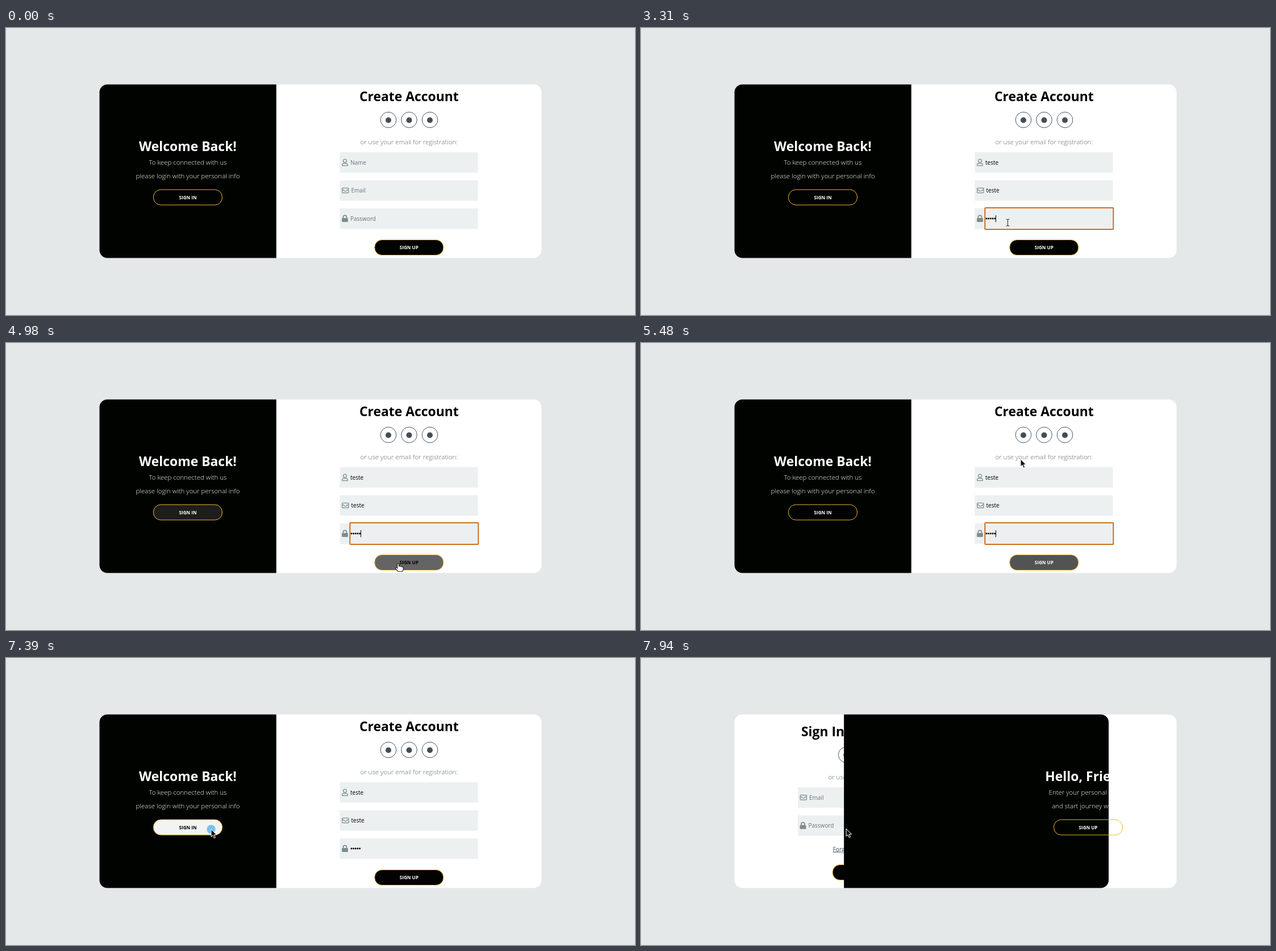
Recreate the animation shown at these times as an HTML page. Size 1107 by 506 pixels, loop 7990 ms.

```html
<!DOCTYPE html>
<html lang="en">
<head>
<meta charset="utf-8">
<title>Sign in / sign up</title>
<style>
  html, body { margin: 0; width: 100%; height: 100%; overflow: hidden; background: #e4e8e8; }
  svg { display: block; width: 1107px; height: 506px; font-family: "Open Sans", "Noto Sans", sans-serif; }
  text { white-space: pre; }
  .title { font-size: 22.9px; font-weight: 700; }
  .copy { font-size: 11.5px; font-weight: 300; }
  .label { font-size: 8.1px; font-weight: 700; }
  .input { font-size: 10px; }
  .mid { text-anchor: middle; }
</style>
</head>
<body>
<svg id="stage" viewBox="0 0 1107 506" xmlns="http://www.w3.org/2000/svg"></svg>
<script>
const LOOP = 7990, SWAP = 7430, SLIDE = 1100, CLICK = 7340;
const INK = '#000300', GOLD = '#ecb731', GREY = '#7f8c8d', FIELD = '#ecf0f1';
const BOX = { x: 164.5, y: 99.5, w: 778, h: 306, r: 14 };

// ---------- markup helpers ----------
const text = (cls, x, y, str, fill, id = '') =>
  `<text class="${cls}" x="${x}" y="${y}" fill="${fill}" ${id && `id="${id}"`}>${str}</text>`;

const button = (id, cx, y, label, fill) =>
  `<rect id="${id}" x="${cx - 60.5}" y="${y}" width="121" height="27" rx="13" fill="${fill}" stroke="${GOLD}"/>` +
  text('label mid', cx, y + 16.6, label, '#fff', id + 'Text');

const social = (id, cx, cy) =>
  `<g><circle id="${id}" cx="${cx}" cy="${cy}" r="13.8" fill="#fff" stroke="#4b5560"/>` +
  `<circle id="${id}Mark" cx="${cx}" cy="${cy + .5}" r="5" fill="#434d56"/></g>`;

const icons = {
  user: `<g fill="none" stroke="${GREY}" stroke-width="1.25"><circle cx="9" cy="15.3" r="2.9"/>
    <path d="M4.2 23.6v-1.1q0-2.9 2.9-2.9h3.8q2.9 0 2.9 2.9v1.1z" stroke-linejoin="round"/></g>`,
  mail: `<g fill="none" stroke="${GREY}" stroke-width="1.25" stroke-linejoin="round">
    <rect x="4.2" y="13.6" width="11.2" height="8.6" rx="1"/><path d="M4.4 15.8l4.4 3.3q1 .7 2 0l4.4-3.3"/></g>`,
  lock: `<rect x="3.6" y="17" width="10.8" height="7" rx="1.3" fill="${GREY}"/>
    <path d="M6 17.4v-2a3 3 0 0 1 6 0v2" fill="none" stroke="${GREY}" stroke-width="1.7"/>`
};

const field = (id, x, y, icon, pad, hint) =>
  `<g transform="translate(${x} ${y})"><rect width="243" height="36" fill="${FIELD}"/>${icons[icon]}` +
  `<rect id="${id}Ring" x="${pad - .7}" y="-1" width="${244.5 - pad}" height="38" rx="1" fill="${FIELD}" stroke="#cc6f1c" stroke-width="2" display="none"/>` +
  text('input', pad, 21.6, hint, '#6b7377', id) +
  `<g id="${id}Dots"></g><path id="${id}Caret" stroke="#000" display="none"/></g>`;

document.getElementById('stage').innerHTML = `
  <rect width="1107" height="506" fill="#e4e8e8"/>
  <rect x="${BOX.x}" y="${BOX.y}" width="${BOX.w}" height="${BOX.h}" rx="${BOX.r}" fill="#fff"/>
  <g id="join">
    ${text('title mid', 709.3, 128.6, 'Create Account', '#000')}
    ${social('so0', 673, 162)}${social('so1', 709.5, 162)}${social('so2', 746, 162)}
    ${text('copy mid', 709.3, 205, 'or use your email for registration:', '#5d6769')}
    ${field('name', 587.5, 219, 'user', 18.5, 'Name')}
    ${field('email', 587.5, 268.5, 'mail', 20, 'Email')}
    ${field('pass', 587.5, 318, 'lock', 18.5, 'Password')}
    ${button('up', 709.3, 373.5, 'SIGN UP', INK)}
  </g>
  <g id="login">
    ${text('title', 282, 137.6, 'Sign In', '#000')}
    ${social('lo0', 361.2, 170.6)}${social('lo1', 397.7, 170.6)}${social('lo2', 434.2, 170.6)}
    ${text('copy mid', 397.7, 214, 'or use your email account:', '#5d6769')}
    ${field('mail2', 276, 228, 'mail', 20, 'Email')}
    ${field('pass2', 276, 277.5, 'lock', 18.5, 'Password')}
    <text x="337.5" y="340.6" font-size="10.2" fill="#34495e" text-decoration="underline">Forgot your password?</text>
    ${button('enter', 397.7, 364.5, 'SIGN IN', INK)}
  </g>
  <path id="panel" fill="${INK}"/>
  <g id="back">
    ${text('title mid', 320, 217, 'Welcome Back!', '#fff')}
    ${text('copy mid', 320, 241, 'To keep connected with us', '#fff')}
    ${text('copy mid', 320, 265, 'please login with your personal info', '#fff')}
    ${button('in', 320, 285, 'SIGN IN', INK)}
  </g>
  <g id="hello">
    ${text('title mid', 787, 217, 'Hello, Friend!', '#fff')}
    ${text('copy mid', 787, 241, 'Enter your personal details', '#fff')}
    ${text('copy mid', 787, 265, 'and start journey with us', '#fff')}
    ${button('side', 787, 285, 'SIGN UP', 'none')}
  </g>
  <circle id="ripple" fill="#68c0f1"/>
  <g id="pointer">
    <path id="arrow" d="M0 0V13.4L3.1 10.6 5.3 15.6 7.6 14.6 5.4 9.8H9.6Z" fill="#111" stroke="#fff" stroke-width="1"/>
    <g id="beam" fill="none">
      <path d="M-3-6Q0-6 0-4.5Q0-6 3-6M0-5V5M-3 6Q0 6 0 4.5Q0 6 3 6" stroke="#fff" stroke-width="2.6"/>
      <path d="M-3-6Q0-6 0-4.5Q0-6 3-6M0-5V5M-3 6Q0 6 0 4.5Q0 6 3 6" stroke="#222" stroke-width="1.1"/>
    </g>
    <path id="hand" d="M-1.4 1Q0-.8 1.4 1V5Q2.8 4 4 5.3 5.3 4.6 6.4 6 8.8 5.4 8.9 8V10.5Q8.8 12.4 7.6 14H-.4Q-2-12 -2 12L-4.6 8.6Q-4.8 6.6 -2.8 7.2L-1.4 8.6Z" fill="#fff" stroke="#1a1a1a" stroke-width="1.1" stroke-linejoin="round"/>
  </g>`;

const $ = id => document.getElementById(id);
$('hand').setAttribute('d', 'M-1.4 1Q0-.8 1.4 1V5Q2.8 4 4 5.3 5.3 4.6 6.4 6 8.8 5.4 8.9 8V10.5Q8.8 12.4 7.6 14H-.4L-4.6 8.8Q-4.8 6.6-2.8 7.2L-1.4 8.6Z');
const show = (id, on) => $(id).setAttribute('display', on ? 'inline' : 'none');
const set = (id, attrs) => { for (const k in attrs) $(id).setAttribute(k, attrs[k]); };
const clamp = v => Math.max(0, Math.min(1, v));
const lerp = (a, b, p) => a + (b - a) * p;

// CSS "ease": cubic-bezier(.25, .1, .25, 1)
function ease(x) {
  if (x <= 0 || x >= 1) return clamp(x);
  let lo = 0, hi = 1, s;
  for (let i = 0; i < 24; i++) {
    s = (lo + hi) / 2;
    const bx = .75 * s * (1 - s) * (1 - s) + .75 * s * s * (1 - s) + s * s * s;
    if (bx < x) lo = s; else hi = s;
  }
  return .3 * s * (1 - s) * (1 - s) + 3 * s * s * (1 - s) + s * s * s;
}

// ---------- timeline ----------
const route = [ // time, x, y of the pointer
  [1190, 626, 246], [1440, 630, 287], [2150, 630, 287], [2400, 645.5, 343], [3560, 645.5, 343],
  [3890, 380, 301], [4060, 364, 297], [4210, 358, 292], [4630, 358, 292], [4680, 383, 297],
  [4860, 652, 376], [5050, 712, 396], [5200, 705, 392], [5285, 697, 373], [5480, 668, 205],
  [5600, 673, 163], [5720, 674, 164], [5850, 709, 165], [5960, 709, 165], [6090, 746, 164],
  [6450, 746, 164], [6980, 398, 283], [7025, 380, 288], [7200, 361, 302], [7440, 361, 302], [7600, 361, 301]
];
const hovers = {
  in: [[3890, 4680], [7025, LOOP]],
  up: [[4860, 5285]],
  so0: [[5563, 5768]], so1: [[5798, 6010]], so2: [[6040, 6471]]
};
const entries = [
  { id: 'name', hint: 'Name', pad: 18.5, keys: [490, 650, 810, 980, 1190], focus: [330, 1490] },
  { id: 'email', hint: 'Email', pad: 20, keys: [1540, 1690, 1840, 1990, 2150], focus: [1490, 2550] },
  { id: 'pass', hint: 'Password', pad: 18.5, keys: [2700, 2850, 3010, 3160, 3310], focus: [2550, CLICK], dots: true }
];
const stops = [[0, 40], [5, 50], [25, 60], [45, 50], [60, 40]]; // left %, width %
const clicks = [1490, 2550, CLICK];
const within = (t, [a, b]) => t >= a && t < b;

function hover(id, t) {
  let amount = 0;
  for (const [a, b] of hovers[id])
    if (t >= a) amount = ease((Math.min(t, b) - a) / 500) * (1 - ease((t - b) / 500));
  return { amount, on: hovers[id].some(span => within(t, span)) };
}

function place(t) {
  let i = 0;
  while (i < route.length - 2 && t >= route[i + 1][0]) i++;
  const a = route[i], b = route[i + 1], p = clamp((t - a[0]) / (b[0] - a[0]));
  return [lerp(a[1], b[1], p), lerp(a[2], b[2], p)];
}

function drawEntry({ id, hint, pad, keys, focus, dots }, t) {
  const n = keys.filter(k => t >= k).length, el = $(id), on = within(t, focus);
  const str = n ? (dots ? '' : 'teste'.slice(0, n)) : hint;
  if (el.textContent !== str) el.textContent = str;
  el.setAttribute('fill', n ? '#000' : '#6b7377');
  if (dots) $(id + 'Dots').innerHTML = Array.from({ length: n }, (_, i) =>
    `<circle cx="${pad + 2 + i * 3.65}" cy="18" r="1.45"/>`).join('');
  const width = !n ? 0 : dots ? n * 3.65 : el.getComputedTextLength();
  const x = Math.floor(pad + width) + 1;
  set(id + 'Caret', { d: `M${x} 12.2v12` });
  show(id + 'Ring', on);
  show(id + 'Caret', on && !within(t, [3910, 4630]));
}

function drawPanel(t, swapped) {
  const p = clamp((t - SWAP) / SLIDE) * 4, i = Math.min(3, Math.floor(p)), e = ease(p - i);
  const x = BOX.x + BOX.w * lerp(stops[i][0], stops[i + 1][0], e) / 100;
  const w = BOX.w * lerp(stops[i][1], stops[i + 1][1], e) / 100;
  const { y, h, r } = BOX, end = x + w;
  set('panel', { d: swapped
    ? `M${x} ${y}H${end - r}a${r} ${r} 0 0 1 ${r} ${r}v${h - 2 * r}a${r} ${r} 0 0 1 ${-r} ${r}H${x}Z`
    : `M${end} ${y}H${x + r}a${r} ${r} 0 0 0 ${-r} ${r}v${h - 2 * r}a${r} ${r} 0 0 0 ${r} ${r}H${end}Z` });
}

function drawPointer(t) {
  const [x, y] = place(t);
  const inside = (l, top, w, h) => x >= l && x <= l + w && y >= top && y <= top + h;
  const hand = t < CLICK && Object.keys(hovers).some(id => hover(id, t).on);
  const beam = t < CLICK && [219, 268.5, 318].some(top => inside(605, top, 226, 36));
  const kind = hand ? 'hand' : beam ? 'beam' : 'arrow';
  for (const k of ['arrow', 'beam', 'hand']) show(k, k === kind);
  set('pointer', { transform: `translate(${x} ${y})` });
  show('pointer', t >= route[0][0]);

  const start = clicks.find(c => within(t, [c, c + 350]));
  show('ripple', start !== undefined);
  if (start !== undefined) {
    const dt = t - start;
    set('ripple', { cx: x, cy: y, r: 7 + dt * .0125, opacity: .92 * (1 - (dt / 350) ** 3) });
  }
}

function draw(t) {
  const swapped = t >= SWAP;
  for (const id of ['join', 'back']) show(id, !swapped);
  for (const id of ['login', 'hello']) show(id, swapped);
  for (const id in hovers) {
    const { amount, on } = hover(id, t), v = Math.round(255 * amount);
    if (id.startsWith('so')) {
      set(id, { fill: `rgb(${255 - v},${255 - v},${255 - v})` });
      set(id + 'Mark', { fill: on ? '#fff' : '#434d56' });
    } else {
      set(id, { fill: `rgb(${v},${Math.max(3, v)},${v})` });
      set(id + 'Text', { fill: on ? '#000' : '#fff' });
    }
  }
  entries.forEach(entry => drawEntry(entry, t));
  drawPanel(t, swapped);
  drawPointer(t);
}

const begin = performance.now();
function tick() {
  draw((performance.now() - begin) % LOOP);
  requestAnimationFrame(tick);
}
tick();
</script>
</body>
</html>
```
